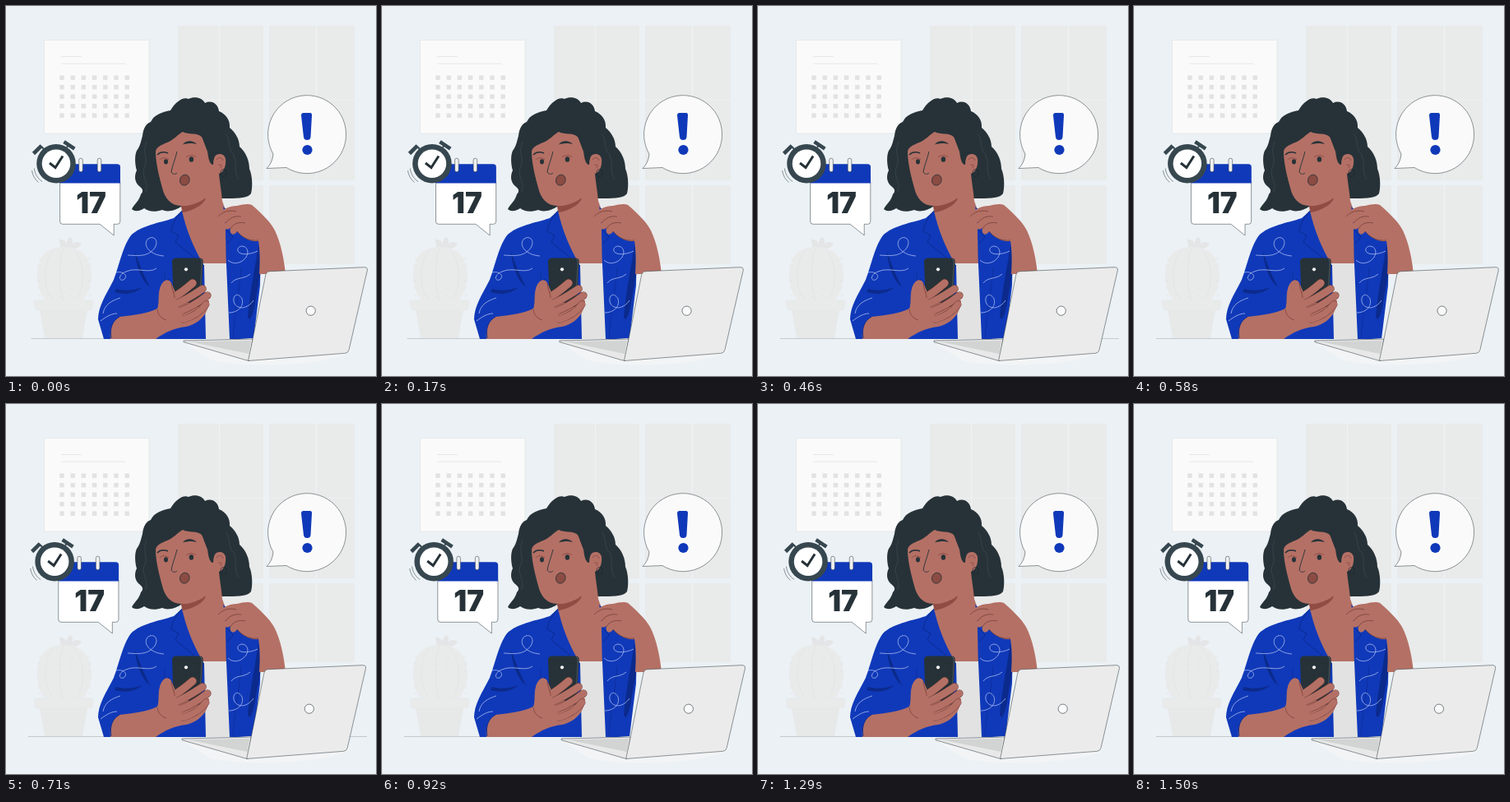
Animation, 450 px wide and 450 px high, one loop 1540 ms. Source, as an HTML page with a canvas:

```html
<!DOCTYPE html>
<html lang="en">
<head>
<meta charset="utf-8">
<title>Deadline</title>
<style>
html, body { margin: 0; width: 100%; height: 100%; overflow: hidden; background: #ebf1f5; }
canvas { display: block; width: 450px; height: 450px; }
</style>
</head>
<body>
<canvas id="stage"></canvas>
<script>
const canvas = document.getElementById('stage');
const ctx = canvas.getContext('2d');
const scale = window.devicePixelRatio || 1;
canvas.width = canvas.height = 450 * scale;

const LOOP = 1540, STEPS = 37;
const INK = '#263238', SLATE = '#37474f', BLUE = '#1039b9', NAVY = '#0b2a8c', CURL = '#a9bbf0';
const SKIN = '#b47065', SKIN_DARK = '#8f4c42', SKIN_LINE = '#6f3a34';
const PALE = '#e9eaea', PAPER = '#fafafa';

// Sideways shake: [ms, px]
const SHAKE = [[0, 0], [143, -.5], [292, 2], [432, -3.2], [586, 4], [735, -3.2], [880, 4],
  [1020, -3.2], [1172, 2.2], [1320, -.5], [1468, .4], [1540, 0]];

function shakeAt(ms) {
  const i = SHAKE.findIndex(key => key[0] > ms);
  const [t0, x0] = SHAKE[i - 1], [t1, x1] = SHAKE[i];
  return x0 + (x1 - x0) * (ms - t0) / (t1 - t0);
}

function shape(d, fill, stroke, width = .5) {
  const path = new Path2D(d);
  if (fill) { ctx.fillStyle = fill; ctx.fill(path); }
  if (stroke) { ctx.strokeStyle = stroke; ctx.lineWidth = width; ctx.stroke(path); }
}
const line = (d, color, width) => shape(d, null, color, width);
function rect(x, y, w, h, fill) { ctx.fillStyle = fill; ctx.fillRect(x, y, w, h); }
function oval(x, y, rx, ry, fill, stroke, width = .6, turn = 0) {
  ctx.beginPath();
  ctx.ellipse(x, y, rx, ry, turn, 0, 7);
  if (fill) { ctx.fillStyle = fill; ctx.fill(); }
  if (stroke) { ctx.strokeStyle = stroke; ctx.lineWidth = width; ctx.stroke(); }
}

function drawRoom() {
  rect(0, 0, 450, 450, '#ebf1f5');
  for (const [x, bar] of [[209, 259.5], [320, 377.5]]) {
    rect(x, 24, 104, 188, PALE);
    rect(x, 218, 104, 96, PALE);
    line(`M${bar} 24V212M${bar} 218V314M${x} 114H${x + 104}`, '#f0f2f3', 1.2);
  }
  shape('M46.5 41.5H174V155H46.5Z', PAPER, '#e4e6e7', .8);
  line('M67 61.5H92M67 70.2H145', '#e0e0e0', .7);
  for (let row = 0; row < 5; row++)
    for (let col = 0; col < 7; col++)
      rect(65.3 + col * 13.2, 84.5 + row * 11.5, 5.4, 5.4, '#e2e2e2');
}

function drawCactus() {
  shape('M66 293C67 289 64 286 65 284C69 283 72 286 74 289C74 285 76 282 79 281C81 284 81 287 81 289C85 286 89 287 92 289C89 294 83 296 78 296Z', '#e4e5e6');
  shape('M49 359C35 345 34 314 47 301C58 290 82 290 94 301C108 315 107 344 92 359Z', '#e9eaea');
  line('M57 298C44 314 45 343 57 357M70 294C63 312 64 340 70 358M84 298C97 315 96 344 85 357', '#e0e2e3', .7);
  for (let i = 0; i < 6; i++) {
    const y = 306 + i * 9;
    line(`M${39 - i % 2} ${y}l4 2M${99 + i % 2} ${y + 2}l4 -2M64 ${y + 3}l4 -2M78 ${y}l3 3`, '#e0e2e3', .6);
  }
  shape('M41 369H99L93 404H47Z', '#e7e8e8');
  shape('M36 358H104Q106 358 106 360L104 370H36L34 360Q34 358 36 358Z', '#e9eaea', '#e3e5e6');
}

function drawHead() {
  shape('M153 247C156 241 162 237 164 229C168 225 166 222 162 219C156 214 156 206 159 200C157 194 156 182 159 176C163 171 164 165 166 158C167 149 170 143 176 141C180 132 190 129 200 127C206 117 215 110 222 113C230 109 239 112 242 118C250 114 258 119 259 128C267 131 273 139 272 148C279 154 284 162 284 171C291 177 296 187 296 198C300 207 300 221 298 228C294 235 276 234 260 234L214 243C207 249 196 251 190 248C181 251 173 250 168 246C164 249 157 251 153 247Z', INK);
  line('M171 165C165 180 174 187 168 197C164 207 174 213 170 226M267 155C274 164 269 174 277 181C282 192 276 201 283 211', '#3d4f57', .6);
  shape('M182 177C183 171 189 169 196 166C204 163 208 157 215 153C222 157 232 153 239 160C245 164 246 172 247 181L250 193L254 183C257 178 266 179 267 186C268 194 265 202 259 204C260 215 262 225 263 237L272 262V314H222L213 243C201 243 193 234 190 221C187 210 182 192 182 177Z', SKIN);
  shape('M213 243C224 244 236 239 243 233C242 240 231 248 215 251Z', SKIN_DARK);
  shape('M237 156C246 159 253 168 253 179L252 193C247 193 246 183 245 177Z', INK);
  line('M256 187C259 183 263 184 264 188M258 194C262 191 263 194 261 197', SKIN_LINE, .6);
  oval(264.5, 203, 3.5, 4.5, null, '#17242b');
  line('M184 181C187 178 192 177 197 179', INK, 1.6);
  shape('M215 168.5C219 163 227 163 232 168C226 166.5 221 167 215 168.5Z', INK);
  oval(194.5, 189.3, 2.5, 3.1, INK);
  oval(225.4, 186.5, 2.7, 3.2, INK);
  line('M187 187C190 184 194 184 198 187M219 184C223 181 228 181 231 184', SKIN_LINE, .6);
  line('M208 177C206 186 202 195 201 202C203 205 206 205 208 203', INK, .9);
  oval(217.3, 211.7, 5.8, 6.6, '#8a4b42', INK, .8, .4);
}

function drawBody() {
  shape('M238 313H271L272 405H232Z', '#e2e2e2');
  shape('M214 249L204 258C186 264 164 267 152 279C142 292 137 318 131 333C121 352 112 366 112 381L119 405H243L241 316C228 294 219 272 214 249Z', BLUE);
  shape('M264 244C268 262 267 292 268 314L272 405H301L309 340L310 284C300 270 282 260 264 244Z', BLUE);
  shape('M307 290C304 315 297 342 294 378C297 387 302 372 304 355L310 322Z', NAVY);
  shape('M187 345C190 337 193 334 199 332L194 350ZM134 344C145 347 156 346 166 342C155 351 144 351 132 348Z', NAVY);
  shape('M157 299C162 314 168 328 175 342C166 335 158 318 157 299Z', NAVY);
  line('M214 249C207 257 202 266 201 274L210 279L206 287L241 316M266 269L276 281L269 289', NAVY, .9);
  line('M286 318C285 340 279 366 276 404M193 322C194 340 190 360 184 371', '#0d30a0', 1);

  line('M148 303C162 304 173 305 181 294C187 284 178 278 172 284C166 292 176 303 192 304', CURL, .8);
  line('M134 324C144 322 149 329 143 333C136 335 137 326 146 323C159 317 174 326 183 319', CURL, .8);
  line('M118 374C120 362 130 358 139 355M115 383C122 378 128 374 135 374', CURL, .8);
  line('M270 309C279 318 294 309 294 299C293 289 280 291 282 298C285 304 298 302 306 298', CURL, .8);
  line('M271 373C281 373 290 366 287 356C281 346 274 354 278 362C283 370 294 368 301 358', CURL, .8);
  line('M274 337C280 329 289 333 297 326', CURL, .8);
}

function drawShoulderArm() {
  shape('M258 255C262 247 272 243 281 243C288 241 295 240 299 242C307 249 321 261 327 273C334 288 338 306 340 326H308C309 311 309 297 307 286C297 287 288 282 281 274C277 281 271 277 273 270C266 274 263 270 267 263C262 265 257 261 258 255Z', SKIN);
  line('M258 256C265 249 272 248 280 250M267 264C272 257 279 255 286 256M273 271C276 265 283 262 291 264M281 274C288 283 298 286 307 285', SKIN_LINE, .7);
}

function drawPhoneHand() {
  shape('M127 405C126 393 129 383 138 378C155 376 173 374 184 368C187 361 184 350 188 342C190 333 198 331 200 336L205 351L247 358C247 372 237 386 219 390C204 392 195 396 182 405Z', SKIN);
  line('M128 404C126 392 129 383 138 378', NAVY, .9);
  shape('M207 306.5H235Q240 306.5 239.7 311L237 362Q236 366 232 366H209Q204 366 203.8 361L202 311Q202 306.5 207 306.5Z', INK);
  line('M236 307.5Q238.5 308 238.2 312L235.5 362', '#53636b', .8);
  oval(219, 320.3, 2.1, 2.1, '#f5f5f5');
  shape('M187 344C190 334 198 331 201 337L207 350C214 353 222 359 230 370L219 389C200 389 184 379 187 344Z', SKIN);
  ctx.lineCap = 'round';
  const fingers = ['M202 355C212 350 219 344 227 337', 'M207 362C220 357 230 350 239 344',
    'M212 371C226 366 236 359 245 352', 'M216 381C230 377 238 370 243 363'];
  fingers.forEach((finger, i) => {
    line(finger, SKIN_LINE, 9.8 - i * .3);
    line(finger, SKIN, 9 - i * .3);
  });
  ctx.lineCap = 'butt';
  shape('M187 344C190 334 198 331 201 337C204 345 205 352 206 356L216 382L208 389C194 384 184 377 187 344Z', SKIN);
  line('M201 337C202 346 205 350 205 355M184 369C185 376 189 380 195 382', SKIN_LINE, .7);
}

function drawWarning() {
  shape('M325 180A47.5 47.5 0 1 1 341 196.5L317 197.5Q324 191 325 180Z', PAPER, INK);
  shape('M362 130H369.5Q372.3 130 372 133L370.5 159.5Q370 163 366.3 163Q362.5 163 362 159.5L359 133Q359 130 362 130Z', BLUE);
  oval(366.5, 175, 6.1, 6.1, BLUE);
}

function drawLaptop() {
  shape('M217 410L298 404L418 415C429 420 405 430 365 434C325 438 278 438 250 431Z', '#f2f4f5');
  shape('M216 407L300 405L296 431.5L293 431L216 408.7Z', '#e8e8e8', INK);
  shape('M223 408.3L298 407L295.5 423Z', '#d2d3d3');
  shape('M320 322.8L435.5 317.7Q440 317.7 439.4 321.5L417 418.5Q416 422 412.5 422.3L294.5 431.5L299.5 408L315.8 327Q316.6 323 320 322.8Z', '#ebebeb', INK);
  oval(370.7, 370.7, 5.6, 5.6, PAPER, INK);
}

function drawCalendar() {
  shape('M65.6 214V262Q65.6 265.3 69 265.3H114L131.2 279V265.3H135.5Q138.8 265.3 138.8 262V214Z', '#fff', INK);
  shape('M65.5 215.5V196Q65.5 192.3 69.3 192.3H135.2Q139 192.3 139 196V215.5Z', BLUE);
  for (const x of [91, 113.5])
    shape(`M${x - 2.3} 187.5a2.3 2.3 0 0 1 4.6 0V199.5a2.3 2.3 0 0 1 -4.6 0Z`, '#f0f0f0', INK);
  ctx.fillStyle = INK;
  ctx.font = '900 35px Inter, sans-serif';
  ctx.textAlign = 'center';
  ctx.fillText('17', 103.5, 251.5);
}

function drawClock() {
  line('M33.5 179.5L43.2 169.8M70.5 165.2L83.3 173.6', SLATE, 4.6);
  line('M46 174L43 171M74 172L76 169', SLATE, 2);
  oval(61, 191.7, 23.8, 23.8, SLATE);
  oval(61, 191.7, 17.3, 17.3, '#fff');
  line('M53 191L60 196.5L69 182.5', INK, 3);
  line('M34.3 197.5C35.2 204.5 38.7 210 44 213.5M31.5 200C32.3 206 35.2 211 39.5 214.5', INK, .5);
}

function draw(ms) {
  const step = Math.floor((ms + 5) % LOOP / LOOP * STEPS);
  const time = step * LOOP / STEPS;
  const dx = shakeAt(time);
  ctx.setTransform(scale, 0, 0, scale, 0, 0);
  drawRoom();
  drawCactus();
  line(`M${time < 400 ? 30.5 : 27} 404.5H300`, '#b9c0c4', .8);
  if (dx < -.3) line('M410 404.5H439', '#b9c0c4', .8);
  drawHead();
  drawBody();
  drawShoulderArm();
  drawPhoneHand();
  drawWarning();
  ctx.translate(dx, 0);
  drawLaptop();
  drawCalendar();
  drawClock();
}

const start = performance.now();
function tick() {
  draw((performance.now() - start) % LOOP);
  requestAnimationFrame(tick);
}
tick();
</script>
</body>
</html>
```
